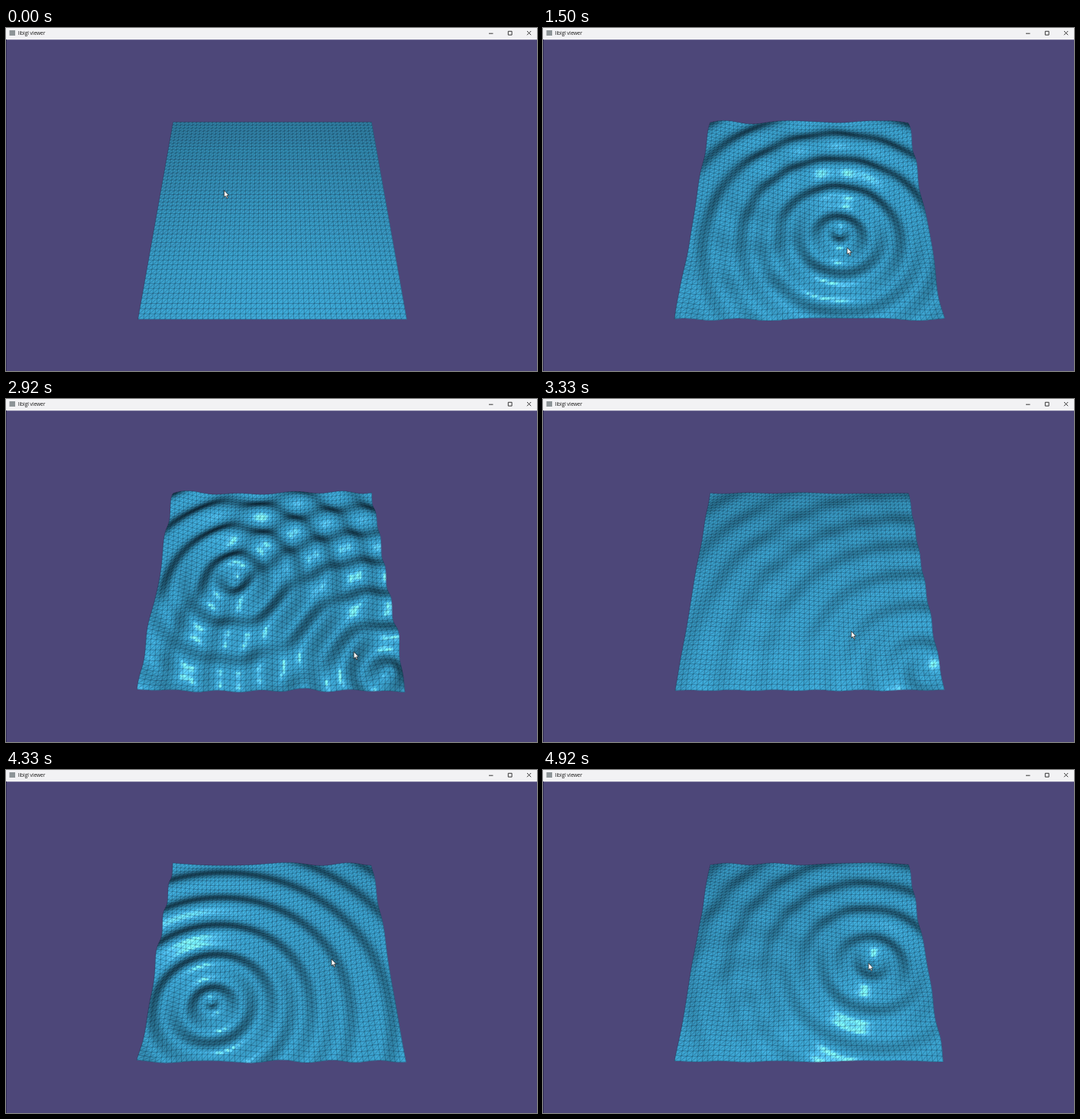
Animation, 695 px wide and 450 px high, one loop 5000 ms. Source, as an HTML page with a canvas:

```html
<!DOCTYPE html>
<html lang="en">
<head>
<meta charset="utf-8">
<title>libigl viewer</title>
<style>
  html, body { margin: 0; width: 695px; height: 450px; overflow: hidden; background: #4d4779; }
  canvas { display: block; }
</style>
</head>
<body>
<canvas id="stage" width="695" height="450"></canvas>
<script>
const ctx = document.getElementById('stage').getContext('2d');
const LOOP = 5000, FRAMES = 60;

// Camera: the sheet spans -1..1 and is tilted away from the viewer.
const CX = 348.5, CY = 233.3, FOCAL = 528.4, DIST = 3.54, COS = 0.846, SIN = 0.533;
const LIGHT_Y = 0.212, SHINE = 35;
const DIFFUSE = [58, 160, 203], SPECULAR = [78, 92, 94];

// Waves
const CELLS = 50, SUB = 2, N = CELLS * SUB;
const K = 2 * Math.PI / 0.318, SPEED = 0.41, LAG = 0.1, AMP = 0.053, PEAK = 0.26, FADE = 0.5;
const drops = [ // birth in seconds, u, v, strength
  [0.57, -0.45, 0.165, 1.9],
  [1.14, 0.253, -0.29, 1],
  [2.36, -0.337, -0.02, 1.5],
  [2.75, 0.885, -0.885, 1],
  [4.04, -0.483, -0.544, 1],
  [4.34, 0.533, -0.157, 1.35]
];
const pointer = [ // ms, x, y
  [0, 285.5, 213], [160, 285.5, 213], [166, 282, 213], [580, 282, 213],
  [1140, 388, 271], [1500, 398, 288], [2080, 325.5, 250], [2360, 298, 235],
  [2690, 500, 363], [2920, 454.5, 331], [3330, 404, 304.5], [4040, 270, 308],
  [4330, 426, 248], [5000, 426, 254]
];

function activeWaves(t) {
  return drops.filter(d => t > d[0]).map(([birth, u, v, strength]) => {
    const age = t - birth, x = age / PEAK;
    return { u, v, amp: AMP * strength * (x * Math.exp(1 - x)) ** 2, crest: SPEED * (age - LAG) };
  }).filter(w => w.amp > 2e-4);
}

// Height and slope of the sheet at (u, v)
function surface(waves, u, v) {
  let h = 0, gu = 0, gv = 0;
  for (const w of waves) {
    const du = u - w.u, dv = v - w.v, r = Math.hypot(du, dv) || 1e-6;
    const amp = w.amp * Math.exp(-FADE * r), phase = K * (r - w.crest);
    const wave = amp * Math.cos(phase);
    const slope = -(amp * K * Math.sin(phase) + FADE * wave) / r;
    h += wave;
    gu += slope * du;
    gv += slope * dv;
  }
  return { h, gu, gv };
}

const toView = (u, v, h) => [u, COS * v + SIN * h, COS * h - SIN * v - DIST];

function project(u, v, h) {
  const [x, y, z] = toView(u, v, h);
  return [CX - FOCAL * x / z, CY + FOCAL * y / z];
}

function unit(x, y, z) {
  const n = Math.hypot(x, y, z);
  return [x / n, y / n, z / n];
}

const dot = (a, b) => a[0] * b[0] + a[1] * b[1] + a[2] * b[2];

function shade(u, v, { h, gu, gv }) {
  const [x, y, z] = toView(u, v, h);
  const normal = unit(-gu, SIN - COS * gv, COS + SIN * gv);
  const light = unit(-x, LIGHT_Y - y, -z), eye = unit(-x, -y, -z);
  const facing = dot(normal, light);
  const mirror = normal.map((n, i) => 2 * facing * n - light[i]);
  const gloss = Math.max(0, dot(mirror, eye)) ** SHINE;
  const diffuse = 0.1 + Math.max(0, facing);
  const rgb = DIFFUSE.map((c, i) => Math.min(255, Math.round(c * diffuse + SPECULAR[i] * gloss)));
  return `rgb(${rgb})`;
}

function drawSheet(t) {
  const waves = activeWaves(t), step = 2 / N, points = [];
  for (let j = 0; j <= N; j++) {
    points.push([]);
    for (let i = 0; i <= N; i++) {
      const u = i * step - 1, v = 1 - j * step;
      points[j].push(project(u, v, surface(waves, u, v).h));
    }
  }
  ctx.strokeStyle = 'rgba(0,10,22,0.4)';
  ctx.lineWidth = 0.6;
  // Far rows first, so that near crests hide what lies behind.
  for (let j = 0; j < N; j += SUB) {
    for (let k = j; k < j + SUB; k++) {
      for (let i = 0; i < N; i++) fillPatch(waves, points, i, k, step);
    }
    ctx.beginPath();
    for (let i = 0; i <= N; i++) ctx.lineTo(...points[j][i]);
    for (let i = 0; i <= N; i += SUB) {
      ctx.moveTo(...points[j][i]);
      for (let k = 1; k <= SUB; k++) ctx.lineTo(...points[j + k][i]);
      if (i < N) {
        ctx.moveTo(...points[j + SUB][i]);
        for (let k = 1; k <= SUB; k++) ctx.lineTo(...points[j + SUB - k][i + k]);
      }
    }
    ctx.stroke();
  }
  ctx.beginPath();
  points[N].forEach(p => ctx.lineTo(...p));
  ctx.stroke();
}

function fillPatch(waves, points, i, j, step) {
  const u = (i + 0.5) * step - 1, v = 1 - (j + 0.5) * step, lap = 0.4;
  const [ax, ay] = points[j][i], [bx, by] = points[j][i + 1];
  const [cx, cy] = points[j + 1][i + 1], [dx, dy] = points[j + 1][i];
  ctx.fillStyle = shade(u, v, surface(waves, u, v));
  ctx.beginPath();
  ctx.moveTo(ax, ay);
  ctx.lineTo(bx + lap, by);
  ctx.lineTo(cx + lap, cy + lap);
  ctx.lineTo(dx, dy + lap);
  ctx.fill();
}

function drawWindow() {
  ctx.fillStyle = '#4d4779';
  ctx.fillRect(0, 0, 695, 450);
  ctx.fillStyle = '#f2f2f4';
  ctx.fillRect(0, 0, 695, 15.3);
  ctx.fillStyle = '#2f2a55';
  ctx.fillRect(0, 15, 1, 435);
  ctx.fillStyle = '#8d9497';
  ctx.fillRect(4.5, 3, 7.5, 7);
  ctx.fillStyle = '#111';
  ctx.font = '6.5px "Open Sans", "Noto Sans", sans-serif';
  ctx.fillText('libigl viewer', 15.8, 9.3);
  ctx.strokeStyle = '#222';
  ctx.lineWidth = 0.9;
  ctx.stroke(new Path2D('M632 7.2h5.5M657.3 4.3h4.8v4.8h-4.8zM682 4l5.2 5.2M687.2 4l-5.2 5.2'));
}

function drawPointer(ms) {
  const n = pointer.findIndex(p => p[0] > ms);
  const [t0, x0, y0] = pointer[n - 1], [t1, x1, y1] = pointer[n];
  const p = (ms - t0) / (t1 - t0);
  const arrow = new Path2D('M0 0V9L2.1 7.2L3.6 10.4L5 9.8L3.6 6.7H6.3Z');
  ctx.save();
  ctx.translate(x0 + (x1 - x0) * p, y0 + (y1 - y0) * p);
  ctx.fillStyle = '#fff';
  ctx.strokeStyle = '#111';
  ctx.lineWidth = 0.7;
  ctx.fill(arrow);
  ctx.stroke(arrow);
  ctx.restore();
}

let shown = -1;
function tick() {
  // Twelve pictures a second, with starts rounded to 10 ms
  const now = performance.now() % LOOP;
  const frame = Math.floor((now + 5) * FRAMES / LOOP) % FRAMES;
  if (frame !== shown) {
    shown = frame;
    const ms = frame * LOOP / FRAMES;
    drawWindow();
    drawSheet(ms / 1000);
    drawPointer(ms);
  }
  requestAnimationFrame(tick);
}
tick();
</script>
</body>
</html>
```
